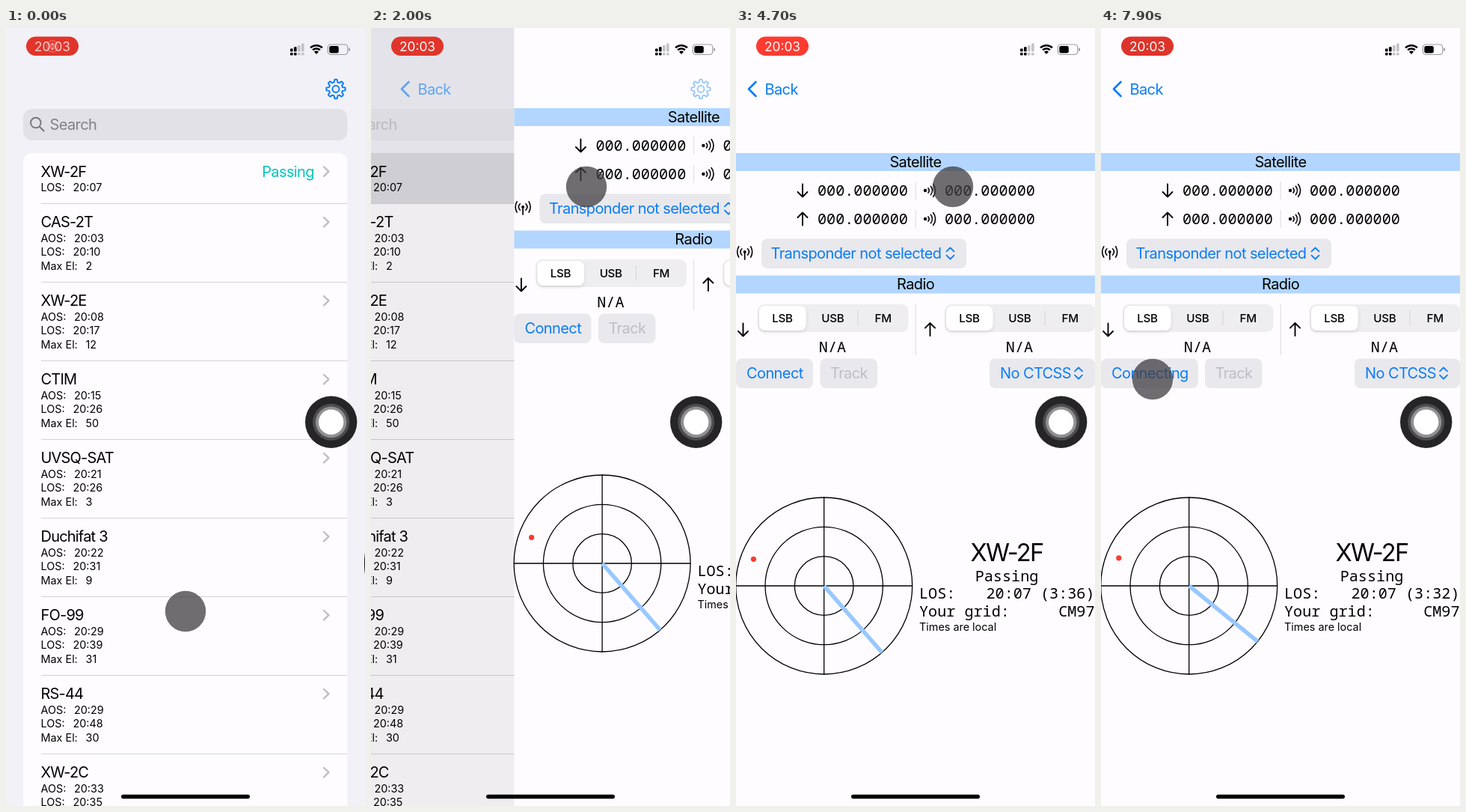
An HTML page for the animation above (8 s loop, 480 by 1039 pixels).

```html
<!DOCTYPE html>
<html lang="en">
<head>
<meta charset="utf-8">
<style>
  html, body { margin: 0; height: 100%; overflow: hidden; background: #fefcff; }
  svg { display: block; width: 100vw; height: 100vh; }
  text { font: 20px Inter, sans-serif; letter-spacing: -.6px; white-space: pre; }
  .name { letter-spacing: -.8px; }
  .small { font-size: 14.4px; letter-spacing: 0; }
  .mono { font: 20.15px "Noto Sans Mono", monospace; letter-spacing: 0; }
  .seg { font-size: 15.2px; font-weight: 500; letter-spacing: -.3px; }
  .clock { font-size: 17.3px; letter-spacing: 0; }
  .big { font-size: 32.5px; letter-spacing: -1.7px; }
  .line { fill: none; stroke-linecap: round; stroke-linejoin: round; }
</style>
</head>
<body>
<svg id="stage" viewBox="0 0 480 1039"></svg>
<script>
const BLUE = '#087cf8', PAPER = '#fefcff', RULE = '#d3d2d7', BUTTON = '#e9e8ec';

// Drawing helpers
const text = (x, y, s, { fill = '#000', cls = '', anchor = 'start', id = '' } = {}) =>
  `<text x="${x}" y="${y}" fill="${fill}" class="${cls}" text-anchor="${anchor}" id="${id}">${s}</text>`;
const rect = (x, y, w, h, fill, r = 0, more = '') =>
  `<rect x="${x}" y="${y}" width="${w}" height="${h}" rx="${r}" fill="${fill}" ${more}/>`;
const circle = (x, y, r, fill, more = '') =>
  `<circle cx="${x}" cy="${y}" r="${r}" fill="${fill}" ${more}/>`;
const line = (d, color = '#000', width = 2) =>
  `<path class="line" d="${d}" stroke="${color}" stroke-width="${width}"/>`;
const group = (id, body, more = '') => `<g id="${id}" ${more}>${body}</g>`;
const middle = { anchor: 'middle' };

// Satellite list
const passes = [
  ['XW-2F', '', '20:07'], ['CAS-2T', '20:03', '20:10', 2], ['XW-2E', '20:08', '20:17', 12],
  ['CTIM', '20:15', '20:26', 50], ['UVSQ-SAT', '20:21', '20:26', 3],
  ['Duchifat 3', '20:22', '20:31', 9], ['FO-99', '20:29', '20:39', 31],
  ['RS-44', '20:29', '20:48', 30], ['XW-2C', '20:33', '20:35', 8]
];

function passRow([name, aos, los, maxEl], i) {
  const top = i ? 129.5 + 105 * i : 167;
  const fields = [['AOS:', aos, 91], ['LOS:', los, 89.5], ['Max El:', maxEl, 106.5]].filter(f => f[1]);
  return text(46.5, top + 31.7, name, { cls: 'name' }) +
    fields.map(([label, value, x], k) => {
      const y = top + 51.2 + 18.6 * k;
      return text(46.5, y, label, { cls: 'small' }) + text(x, y, value, { cls: 'small' });
    }).join('') +
    line(`M425 ${top + 18.5}l6.5 6.2-6.5 6.2`, '#bfbec3', 2.4) +
    (i ? rect(47, top - .5, 409.5, 1, RULE) : '');
}

const searchBar = rect(23, 108, 433.5, 42, '#e2e1e6', 12) +
  circle(39.8, 126.6, 6.8, 'none', 'stroke="#78777c" stroke-width="1.9"') +
  line('M45 132l5.5 5.5', '#78777c', 2.1) +
  text(58.5, 136, 'Search', { fill: '#828187' });

const list = rect(0, 0, 700, 1039, '#f2f1f7') + group('search', searchBar) +
  rect(23, 167, 433.5, 900, PAPER, 12) +
  rect(23, 167, 433.5, 67.5, '#dcdbdf', 0, 'id="pressed"') +
  passes.map(passRow).join('') +
  text(412, 198.5, 'Passing', { fill: '#00c7be', anchor: 'end' });

// Detail page
const down = (x, y) => line(`M${x} ${y - 8.5}v17m-6.5-6.5l6.5 6.5 6.5-6.5`, '#000', 1.9);
const up = (x, y) => line(`M${x} ${y + 8.5}v-17m-6.5 6.5l6.5-6.5 6.5 6.5`, '#000', 1.9);
const picker = (x, y) => line(`M${x - 5} ${y - 2.7}l5-4.8 5 4.8m-10 5.4l5 4.8 5-4.8`, BLUE, 1.8);
const band = (y, s) => rect(0, y, 480, 24, '#b2d6ff') + text(240, y + 18.7, s, middle);

const waves = (x, y) => circle(x, y, 2.2, '#000') +
  [5, 9.2, 13.4].map(r => {
    const dx = r * .8, dy = r * .62;
    return line(`M${x + dx} ${y - dy}A${r} ${r} 0 0 1 ${x + dx} ${y + dy}`, '#000', 1.6);
  }).join('');

const frequencies = (y, arrow) => arrow(89, y) + rect(239.7, y - 12, 1, 24, '#dcdbe0') +
  text(109, y + 7, '000.000000', { cls: 'mono' }) + waves(253, y) +
  text(279, y + 7, '000.000000', { cls: 'mono' });

const modes = x => rect(x, 369, 201.5, 37, '#eeedf0', 9) +
  rect(x + 2, 371, 62.5, 33, '#fff', 8, 'filter="url(#soft)"') +
  rect(x + 133.5, 377, 1, 20, '#d5d4d9') +
  ['LSB', 'USB', 'FM'].map((s, i) => text(x + 33 + 67.3 * i, 392.7, s, { cls: 'seg', anchor: 'middle' })).join('') +
  text(x + 100, 433, 'N/A', { cls: 'mono', anchor: 'middle' });

const antenna = circle(11.7, 299, 2, '#000') + line('M11.7 300v9', '#000', 1.7) +
  [[5.8, 4.2], [10, 7.2]].map(([dx, dy]) => [-1, 1].map(s =>
    line(`M${11.7 + s * (dx - 2)} ${299 - dy}q${s * 4} ${dy} 0 ${2 * dy}`, '#000', 1.6)).join('')).join('');

const radio = band(167, 'Satellite') + frequencies(217, down) + frequencies(255, up) + antenna +
  rect(34, 281.5, 274, 39.5, BUTTON, 7.5) +
  text(160.5, 308, 'Transponder not selected', { fill: BLUE, anchor: 'middle' }) + picker(286.5, 301) +
  band(330.5, 'Radio') + down(9.5, 403) + up(259.5, 402.5) + modes(29) + modes(279) +
  rect(239.7, 369, 1, 68, '#dcdbe0') +
  rect(0, 441.5, 103, 39.5, BUTTON, 7.5, 'id="connectBox"') +
  text(14, 468, 'Connect', { fill: BLUE, id: 'connect' }) +
  group('track', rect(112.5, 441.5, 76.5, 39.5, BUTTON, 7.5) + text(151, 468, 'Track', { fill: '#bfbec3', anchor: 'middle' })) +
  rect(339, 441.5, 141, 39.5, BUTTON, 7.5) + text(353, 468, 'No CTCSS', { fill: BLUE }) + picker(458, 461);

const polar = [118, 78.7, 39.3].map(r => circle(117.7, 745, r, 'none', 'stroke="#000" stroke-width="1.3"')).join('') +
  line('M0 745h235.5M117.7 627v236', '#000', 1.3) +
  '<path id="heading" d="M117.7 745h118" stroke="#98c8ff" stroke-width="5.5"/>' +
  circle(0, 0, 3.6, '#fb3b30', 'id="dot"') +
  text(362, 711.7, 'XW-2F', { cls: 'big', anchor: 'middle' }) +
  text(362, 738.5, 'Passing', { cls: 'mono', anchor: 'middle' }) +
  text(245, 762.3, 'LOS:', { cls: 'mono' }) +
  text(479.5, 762.3, '', { cls: 'mono', anchor: 'end', id: 'left' }) +
  text(245, 786, 'Your grid:', { cls: 'mono' }) +
  text(479.5, 786, 'CM97', { cls: 'mono', anchor: 'end' }) +
  text(245, 805.2, 'Times are local', { cls: 'small' });

// Fixed chrome
function gearPath() {
  let d = '';
  for (let i = 0; i < 96; i++) {
    const a = i / 96 * 2 * Math.PI;
    const r = 11 + 1.7 * Math.max(-1, Math.min(1, 2 * Math.cos(8 * a)));
    d += `${i ? 'L' : 'M'}${(441 + r * Math.sin(a)).toFixed(1)} ${(81.5 - r * Math.cos(a)).toFixed(1)}`;
  }
  return d + 'Z';
}
const gear = line(gearPath(), BLUE, 1.9) + circle(441, 81.5, 4.5, 'none', `stroke="${BLUE}" stroke-width="1.9"`);
const back = line('M26.5 72l-9.5 9.5 9.5 9.5', BLUE, 2.6) + text(38.5, 88.5, 'Back', { fill: BLUE });

const signal = [0, 1, 2, 3].map(i => {
  const x = 380 + 5 * i, h = 4 + 2.3 * i, fill = i < 2 ? '#000' : '#c3c2c8';
  return rect(x, 31.5 - h, 3.6, h, fill, 1) + rect(x, 33, 3.6, 3.6, fill, 1);
}).join('');
const wifi = '<path d="M415 35l-3-3.2a4.2 4.2 0 0 1 6 0z"/>' +
  [7, 11.3].map(r => `<path fill="none" stroke="#000" stroke-width="2.5" d="M${415 - r * .7} ${34.5 - r * .72}a${r} ${r} 0 0 1 ${r * 1.4} 0"/>`).join('');
const battery = rect(430.3, 22, 26.5, 13.5, 'none', 4, 'stroke="#9b9a9f" stroke-width="1.2"') +
  rect(432.3, 24, 12.5, 9.5, '#000', 2.3) + rect(458.2, 26.5, 1.8, 4.5, '#9b9a9f', .9);
const status = rect(27, 11.5, 70, 25.5, '#ff3b30', 12.75, 'id="pill"') +
  text(62, 30.6, '20:03', { fill: '#fff', cls: 'clock', anchor: 'middle', id: 'clock' }) +
  group('record', circle(62, 24.5, 7.5, 'none', 'stroke="#fff" stroke-width="1.3"') + circle(62, 24.5, 4.5, '#fff')) +
  signal + wifi + battery;

const assist = circle(434.7, 526.3, 34.7, '#252427') + circle(434.7, 526.3, 24.5, '#4d4c4f') +
  circle(434.7, 526.3, 20.7, '#918f92') + circle(434.7, 526.3, 16.7, '#fff');

document.getElementById('stage').innerHTML =
  '<filter id="soft" x="-20%" y="-30%" width="140%" height="170%"><feDropShadow dx="0" dy="2" stdDeviation="2.2" flood-opacity=".12"/></filter>' +
  group('list', list) + rect(0, 0, 480, 1039, '#000', 0, 'id="dim"') +
  group('page', rect(0, 0, 480, 1039, PAPER) + group('radio', radio) + group('polar', polar)) +
  group('gear', gear) + group('back', back) + status + assist +
  rect(154, 1023.7, 172, 5.6, '#000', 2.8) +
  circle(0, 0, 27.2, '#403e42', 'fill-opacity=".75" id="touch"');

// Motion
const parts = {};
document.querySelectorAll('[id]').forEach(el => { if (el.id) parts[el.id] = el; });
const set = (id, attrs) => { for (const k in attrs) parts[id].setAttribute(k, attrs[k]); };
const move = (id, x, y = 0) => set(id, { transform: `translate(${x} ${y})` });
const ramp = (t, a, b) => Math.max(0, Math.min(1, (t - a) / (b - a)));
const smooth = (t, a, b) => { const u = ramp(t, a, b); return u * u * (3 - 2 * u); };
const ticks = [3.9, 4.8, 5.4, 6.4, 7.2];

function draw(t) {
  // Critically damped push from the right
  const s = 18.26 * Math.max(0, t - 1.89);
  const rest = t > 2.6 ? 0 : (1 + s) * Math.exp(-s), shown = 1 - rest;
  move('list', -144 * shown);
  move('page', 480 * rest);
  move('back', 60 * rest);
  set('dim', { opacity: .1 * shown });
  set('search', { opacity: rest });
  set('gear', { opacity: rest });
  set('back', { opacity: shown });
  set('pressed', { opacity: t >= 1.85 ? 1 : 0 });
  const settled = t >= 2.4;
  move('radio', 0, settled ? 0 : -60);
  move('polar', 0, settled ? 0 : -30);

  const hop = smooth(t, 4.75, 5.35);
  move('touch',
    240 + 48 * smooth(t, .95, 1.725) + 2 * smooth(t, 3.9, 4.4) - 221 * hop,
    779 - 567 * smooth(t, .95, 1.57) + 257 * hop);

  const connecting = t >= 5.9;
  parts.connect.textContent = connecting ? 'Connecting' : 'Connect';
  set('connectBox', { width: connecting ? 130 : 103 });
  move('track', connecting ? 26.5 : 0);

  parts.left.textContent = `20:07 (3:${37 - ticks.filter(k => t >= k).length})`;
  set('heading', { transform: `rotate(${49 - 10 * ramp(t, 6.5, 7.9) ** 2} 117.7 745)` });
  const drift = ramp(t, 2.7, 7.9);
  move('dot', 23.2 + .6 * drift, 710.3 - 2.5 * drift);

  const glow = .5 + .5 * Math.cos(Math.PI * (t - .7));
  set('pill', { fill: `rgb(${217 + 38 * glow},${51 + 8 * glow},${43 + 5 * glow})` });
  const clockIn = ramp(t, -.3, .2);
  set('clock', { opacity: .4 + .6 * clockIn });
  set('record', { opacity: .6 * (1 - clockIn) });
}

function frame() {
  draw(performance.now() / 1000 % 8);
  requestAnimationFrame(frame);
}
frame();
</script>
</body>
</html>
```
